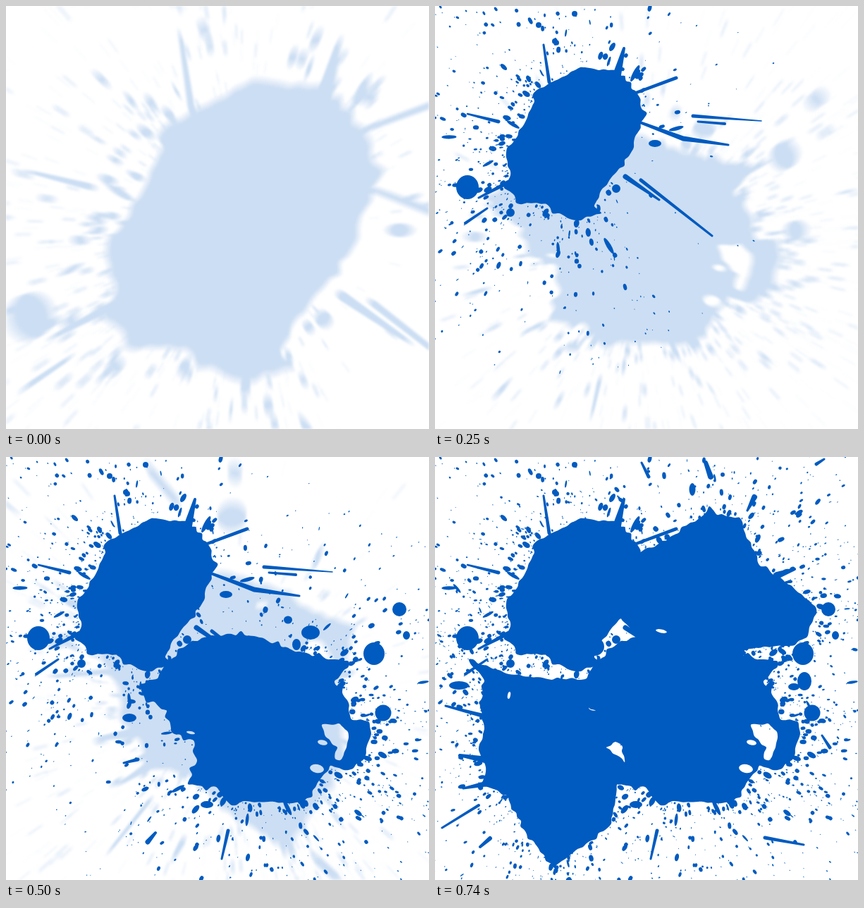
Write an HTML page with a canvas that moves like this. It is 600x600 px and loops after 1940 ms.

```html
<!DOCTYPE html>
<html lang="en">
<head>
<meta charset="utf-8">
<title>Ink splats</title>
<style>
  html, body { margin: 0; width: 100%; height: 100%; overflow: hidden; background: #fff; }
  canvas { display: block; width: 100vw; height: 100vh; }
</style>
</head>
<body>
<canvas id="stage" width="600" height="600"></canvas>
<script>
const SIZE = 600, LOOP = 1940, STEP = 30, STEPS = 4, COPIES = 15;
const INK = '#005bc0';
const OPACITY = [0.2, 0.5, 0.8, 1, 1];

// Each splat flies from `from` (scaled and turned) to `home`.
// body: key points x,y; streaks: x1,y1,x2,y2,halfWidth1,halfWidth2; blots: x,y,rx,ry
// spray: droplets thrown off the body edge, mostly towards `lean` degrees
const splats = [
  {
    start: 0, home: [200, 194], from: [338, 316], scale: 1.97, turn: 0, seed: 11,
    body: [148,117, 180,101, 206,87, 246,91, 261,98, 288,126, 296,160, 284,185, 278,208, 262,230,
      234,265, 226,284, 236,294, 200,304, 176,294, 158,281, 115,279, 112,268, 98,258, 107,240,
      101,208, 113,190, 131,158, 141,135],
    streaks: [154,55,162,108,1.5,2.5, 268,60,258,98,2,6, 342,102,280,125,2.5,2, 104,250,62,272,3,1.5,
      43,308,74,287,2,1.5, 366,156,463,163,2.5,.8, 373,164,411,167,1.5,2, 288,164,352,188,2,3.5,
      352,188,416,197,3.5,1.5, 270,242,318,275,3.5,1.5, 292,247,393,326,2.5,1.5, 46,153,90,164,1.2,2.5],
    blots: [46,257,16,17, 107,293,6,6, 257,259,6,6, 312,195,9,5, 198,11,4,4, 147,27,4,4, 170,50,4,4],
    spray: { count: 750, reach: 230, size: 3.4, lean: 180 }
  },
  {
    start: 250, home: [360, 380], from: [290.6, 340], scale: 1.265, turn: 0, seed: 23,
    body: [230,292, 252,270, 285,255, 320,251, 352,254, 410,276, 462,287, 486,290, 466,318, 484,345,
      490,372, 515,376, 518,392, 508,428, 486,444, 460,438, 442,462, 422,490, 380,489, 338,488,
      320,494, 298,468, 258,464, 271,430, 266,402, 235,390, 228,360, 196,340, 190,322, 215,314],
    hollow: [448,380, 472,378, 485,390, 484,406, 474,430, 467,428, 470,412, 453,396],
    streaks: [167,434,187,429,1.5,2.5, 212,533,201,546,2,3.5, 315,530,306,570,2.5,1.5],
    blots: [558,216,10,10, 522,279,15,16, 535,363,11.5,11.5, 568,253,5,6, 432,249,13,10, 412,266,6,8,
      400,231,6,5.5, 175,370,10,6, 285,493,9,5],
    holes: [449,405,7,3.5, 441,442,10,6, 262,391,6,2],
    spray: { count: 900, reach: 210, size: 3.6, lean: 30 }
  },
  {
    start: 500, home: [165, 430], from: [317, 343], scale: 1.5, turn: -20, seed: 37,
    body: [48,287, 105,308, 160,315, 200,315, 240,345, 268,380, 300,407, 275,440, 258,465, 250,520,
      215,548, 168,582, 155,565, 130,535, 103,480, 68,466, 72,440, 62,415, 70,385, 64,355, 70,318],
    hollow: [243,412, 255,404, 264,408, 269,433, 258,423],
    streaks: [10,526,62,494,1.5,2, 15,353,72,368,1.5,3, 35,423,75,430,2,5, 40,470,75,463,1.5,4,
      64,553,78,541,2,3, 468,540,523,550,2.5,1.5, 168,200,182,238,4,4, 190,600,203,625,4,4],
    blots: [34,324,14,6, 226,269,14,13, 243,231,7,8],
    holes: [105,338,2,5, 224,357,6,2.5],
    spray: { count: 650, reach: 230, size: 3, lean: 130 }
  },
  {
    start: 620, home: [385, 195], from: [295, 262], scale: 1.45, turn: -10, seed: 53,
    body: [242,175, 280,138, 310,128, 340,110, 380,83, 389,70, 400,82, 432,86, 440,108, 462,155,
      505,182, 540,213, 528,255, 495,268, 440,272, 425,320, 360,350, 305,320, 289,258, 262,225, 245,200],
    streaks: [293,8,303,28,1.5,2.5, 384,8,391,28,3,4, 453,57,443,76,4,1.5, 541,10,552,3,2.5,1.5,
      549,395,560,412,1.5,2.5, 510,159,485,168,2,5],
    blots: [365,46,4.5,9, 408,25,3,3, 524,318,10,13, 509,326,8,5],
    holes: [321,247,8,2.5],
    spray: { count: 600, reach: 200, size: 3.4, lean: -50 }
  }
];

function random(seed) {
  return () => (seed = (seed * 16807) % 2147483647) / 2147483647;
}

function groups(list, size, draw) {
  for (let i = 0; i < list.length; i += size) draw(...list.slice(i, i + size));
}

// Splits the clockwise shape into short pieces, jittered outwards with a few teeth.
function ragged(flat, rnd) {
  const keys = [], edge = [];
  groups(flat, 2, (x, y) => keys.push([x, y]));
  keys.forEach(([x, y], i) => {
    const [nx, ny] = keys[(i + 1) % keys.length];
    const dx = nx - x, dy = ny - y, length = Math.hypot(dx, dy);
    const pieces = Math.max(1, Math.round(length / 7));
    for (let k = 0; k < pieces; k++) {
      const tooth = rnd() < 0.13 ? 5 * rnd() : 0;
      const out = (k ? 3.2 * (rnd() - 0.4) + tooth : 0) / length;
      edge.push([x + dx * k / pieces + dy * out, y + dy * k / pieces - dx * out]);
    }
  });
  return edge;
}

// Smooth closed curve; holes wind the other way so that they stay open.
function addCurve(path, edge, hole) {
  const pts = hole ? [...edge].reverse() : edge;
  const n = pts.length, at = i => pts[(i + n) % n];
  path.moveTo(...pts[0]);
  for (let i = 0; i < n; i++) {
    const [a, b, c, d] = [at(i - 1), at(i), at(i + 1), at(i + 2)];
    path.bezierCurveTo(b[0] + (c[0] - a[0]) / 6, b[1] + (c[1] - a[1]) / 6,
      c[0] - (d[0] - b[0]) / 6, c[1] - (d[1] - b[1]) / 6, c[0], c[1]);
  }
  path.closePath();
}

function addOval(path, x, y, rx, ry, angle = 0, hole = false) {
  path.moveTo(x + rx * Math.cos(angle), y + rx * Math.sin(angle));
  path.ellipse(x, y, rx, ry, angle, 0, Math.PI * 2, hole);
  path.closePath();
}

function addStreak(path, x1, y1, x2, y2, w1, w2) {
  const angle = Math.atan2(y2 - y1, x2 - x1), side = Math.PI / 2;
  path.moveTo(x1 + w1 * Math.cos(angle + side), y1 + w1 * Math.sin(angle + side));
  path.arc(x1, y1, w1, angle + side, angle + 3 * side);
  path.arc(x2, y2, w2, angle - side, angle + side);
  path.closePath();
}

function addSpray(path, edge, [cx, cy], { count, reach, size, lean }, rnd) {
  while (count > 0) {
    const [x, y] = edge[Math.floor(rnd() * edge.length)];
    const angle = Math.atan2(y - cy, x - cx) + (rnd() - 0.5) * 0.15;
    const toward = Math.cos(angle - lean * Math.PI / 180);
    if (rnd() > 0.55 + 0.45 * toward) continue;
    const far = rnd() ** 1.7;
    const r = Math.hypot(x - cx, y - cy) + 3 + reach * far;
    const w = 0.5 + size * rnd() ** 3 * (1 - far * 0.7);
    const stretch = rnd() < 0.04 ? 4 : 1 + rnd();
    addOval(path, cx + r * Math.cos(angle), cy + r * Math.sin(angle),
      w * stretch, w, angle + (rnd() - 0.5) * 0.6);
    count--;
  }
}

function buildPath({ seed, home, body, hollow, holes = [], streaks, blots, spray }) {
  const path = new Path2D(), rnd = random(seed), edge = ragged(body, rnd);
  addCurve(path, edge);
  if (hollow) addCurve(path, ragged(hollow, rnd), true);
  groups(holes, 4, (x, y, rx, ry) => addOval(path, x, y, rx, ry, 0.2, true));
  groups(streaks, 6, (...streak) => addStreak(path, ...streak));
  groups(blots, 4, (...blot) => addOval(path, ...blot));
  addSpray(path, edge, home, spray, rnd);
  return path;
}

// One pose of a splat: a zoom blur made of averaged copies, sharp at rest.
function renderPose(splat, step) {
  const canvas = document.createElement('canvas');
  canvas.width = canvas.height = SIZE;
  const ctx = canvas.getContext('2d');
  const mix = (a, b) => a + (b - a) * step / STEPS;
  const copies = step === STEPS ? 1 : COPIES;
  ctx.fillStyle = INK;
  ctx.globalAlpha = 1 / copies;
  ctx.globalCompositeOperation = 'lighter';
  for (let i = 0; i < copies; i++) {
    const spread = copies > 1 ? 0.035 * (2 * i / (copies - 1) - 1) : 0;
    const zoom = mix(splat.scale, 1) * (1 + spread);
    ctx.setTransform(1, 0, 0, 1, mix(splat.from[0], splat.home[0]), mix(splat.from[1], splat.home[1]));
    ctx.rotate(mix(splat.turn, 0) * Math.PI / 180);
    ctx.scale(zoom, zoom);
    ctx.translate(-splat.home[0], -splat.home[1]);
    ctx.fill(splat.path);
  }
  return canvas;
}

for (const splat of splats) {
  splat.path = buildPath(splat);
  splat.poses = OPACITY.map((_, step) => renderPose(splat, step));
}

const stage = document.getElementById('stage').getContext('2d');

function draw(time) {
  stage.globalAlpha = 1;
  stage.filter = 'none';
  stage.fillStyle = '#fff';
  stage.fillRect(0, 0, SIZE, SIZE);
  for (const splat of splats) {
    if (time < splat.start) continue;
    const step = Math.min(STEPS, Math.floor((time - splat.start) / STEP));
    const soft = 1.4 * (1 - step / STEPS);
    stage.globalAlpha = OPACITY[step];
    stage.filter = soft ? `blur(${soft}px)` : 'none';
    stage.drawImage(splat.poses[step], 0, 0);
  }
}

const began = performance.now();
function tick() {
  draw((performance.now() - began) % LOOP);
  requestAnimationFrame(tick);
}
tick();
</script>
</body>
</html>
```
